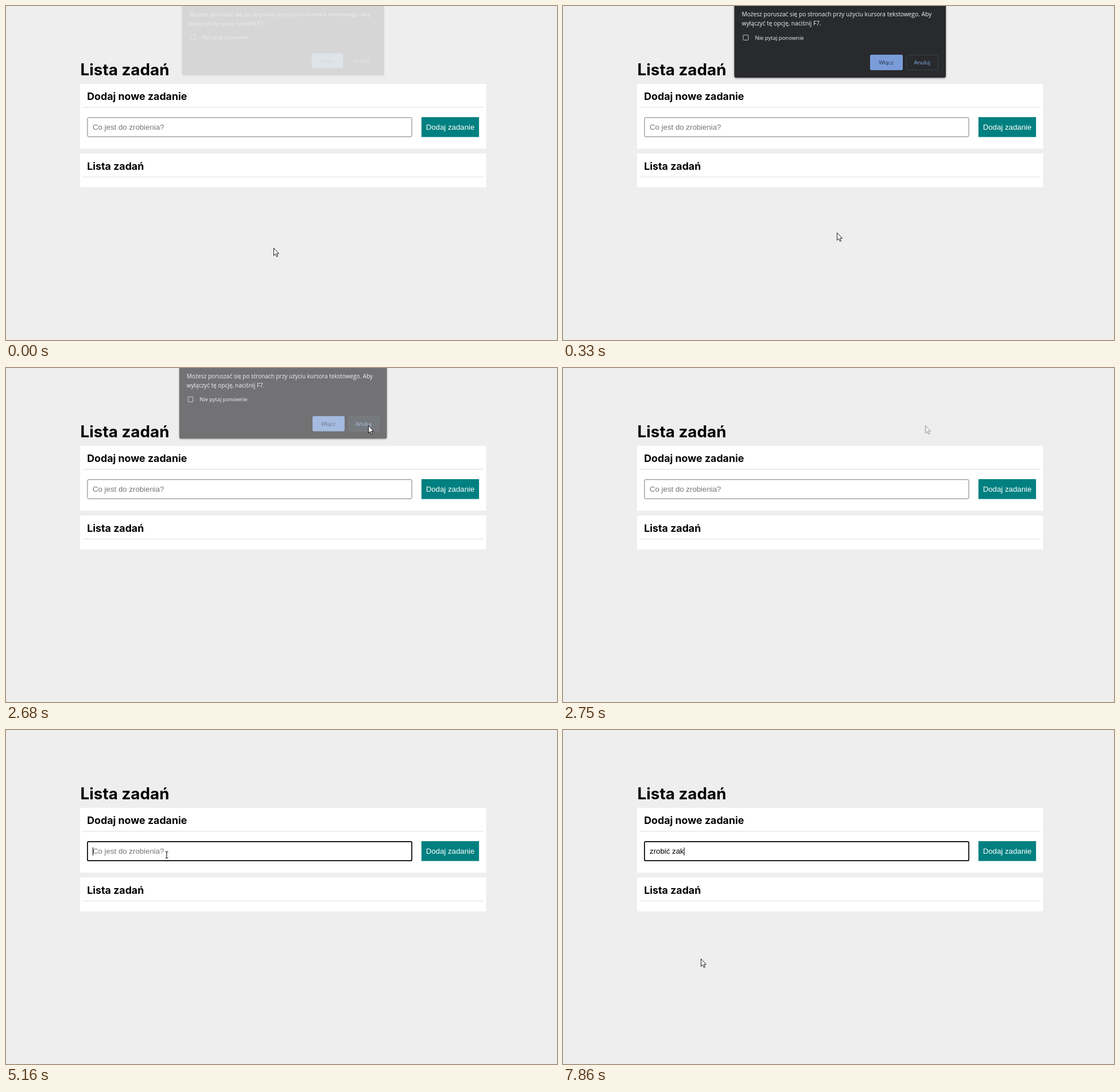
Recreate the animation shown at these times as an HTML page. Size 960 by 583 pixels, loop 7.99 s.

```html
<!DOCTYPE html>
<html lang="pl">
<head>
<meta charset="utf-8">
<title>Lista zadań</title>
<style>
  html, body { margin: 0; width: 100%; height: 100%; overflow: hidden; background: #eee; }
  svg { display: block; width: 960px; height: 583px; }
  text { white-space: pre; }
  .h1, .h2 { font-family: Inter, sans-serif; font-weight: 700; }
  .h1 { font-size: 27.8px; }
  .h2 { font-size: 17.8px; }
  .form { font: 13.26px "Liberation Sans", Arial, sans-serif; }
  .msg { font: 10.2px "Open Sans", "Noto Sans", sans-serif; fill: #f1f3f4; }
  .small { font: 9.5px "Open Sans", "Noto Sans", sans-serif; fill: #f1f3f4; }
  #dialog { transform-origin: 483px 37px; }
  .box { filter: drop-shadow(0 1px 1.5px rgba(0, 0, 0, .5)); }
  #field { fill: #fff; stroke: #767676; }
  #field.focus { stroke: #000; stroke-width: 1.7px; }
</style>
</head>
<body>
<svg viewBox="0 0 960 583">
  <rect width="960" height="583" fill="#eee"/>
  <text class="h1" x="129.6" y="121">Lista zadań</text>

  <rect x="129" y="136" width="707.5" height="113" fill="#fff"/>
  <text class="h2" x="141.2" y="164">Dodaj nowe zadanie</text>
  <rect x="133.5" y="176" width="698.5" height="1.6" fill="#eaeaea"/>
  <rect id="field" x="142" y="194.8" width="565" height="33.4" rx="2"/>
  <text id="entry" class="form" x="151" y="215.5"></text>
  <rect id="caret" y="205" width="1" height="14"/>
  <rect x="723.8" y="194" width="100.4" height="34.7" fill="#008080"/>
  <text class="form" x="774" y="215.5" text-anchor="middle" fill="#fff">Dodaj zadanie</text>

  <rect x="129" y="257.5" width="707.5" height="59" fill="#fff"/>
  <text class="h2" x="141.2" y="285.6">Lista zadań</text>
  <rect x="133.5" y="297.6" width="698.5" height="1.6" fill="#eaeaea"/>

  <g id="dialog">
    <rect class="box" x="298.5" y="-40" width="368.5" height="165" rx="3.5" fill="#292a2d"/>
    <text class="msg" x="311.5" y="17.6">Możesz poruszać się po stronach przy użyciu kursora tekstowego. Aby</text>
    <text class="msg" x="311.5" y="34">wyłączyć tę opcję, naciśnij F7.</text>
    <rect x="314" y="50.7" width="8.8" height="8.8" rx=".6" fill="none" stroke="#bdc1c6"/>
    <text class="small" x="334.5" y="58.6">Nie pytaj ponownie</text>
    <rect x="535" y="85" width="57" height="27" rx="2.5" fill="#7a9dd9"/>
    <text class="small" x="563" y="102" text-anchor="middle" style="fill:#25304a">Włącz</text>
    <rect id="cancel" x="598.5" y="85.5" width="55" height="26" rx="2.5" stroke="#3c4043"/>
    <text class="small" x="625.7" y="102" text-anchor="middle" style="fill:#8ab4f8">Anuluj</text>
  </g>

  <g id="pointer">
    <path id="arrow" d="M.5 .5V13.6L3.5 10.8L5.5 15.6L7.6 14.7L5.6 10.1H9.4Z" fill="#fff" stroke="#000" stroke-width=".9"/>
    <path id="beam" d="M-2.5 -5.5H-.8L0 -4.9L.8 -5.5H2.5M0 -5V5M-2.5 5.5H-.8L0 4.9L.8 5.5H2.5" fill="none" stroke="#000"/>
  </g>
</svg>
<script>
const LOOP = 7990, FOCUS = 4970, BLINK = 530, TYPE = 6650, KEY = 134, CLOSED = 2750;
const HINT = 'Co jest do zrobienia?', TASK = 'zrobić zak';

// Pointer moves: start time, end time, destination
const home = [466, 422];
const moves = [
  [200, 820, 562, 190], [820, 1150, 606, 135], [1220, 1620, 631, 100],
  [2880, 3210, 695, 0], [3680, 4280, 403, 278], [4350, 4690, 306, 321],
  [4690, 5130, 280, 218], [5290, 5500, 240, 399]
];

const $ = id => document.getElementById(id);
const ramp = (t, a, b) => Math.min(1, Math.max(0, (t - a) / (b - a)));
const smooth = p => p * p * (3 - 2 * p);
const show = (id, on) => { $(id).style.display = on ? '' : 'none'; };

function pointerAt(t) {
  return moves.reduce(([x, y], [a, b, toX, toY]) => {
    const p = smooth(ramp(t, a, b));
    return [x + (toX - x) * p, y + (toY - y) * p];
  }, home);
}

function within(id, [x, y]) {
  const b = $(id).getBBox();
  return x > b.x && x < b.x + b.width && y > b.y && y < b.y + b.height;
}

function drawDialog(t, pos) {
  const alpha = ramp(t, -22, 175) * (1 - ramp(t, 2640, CLOSED));
  $('dialog').style.opacity = alpha;
  $('dialog').style.transform = `scale(${.95 + .05 * alpha})`;
  $('cancel').style.fill = within('cancel', pos) ? '#30343b' : '#292a2d';
}

function drawField(t) {
  const typed = TASK.slice(0, Math.max(0, Math.ceil((t - TYPE) / KEY)));
  const entry = $('entry');
  entry.textContent = typed || HINT;
  entry.style.fill = typed ? '#000' : '#757575';
  $('field').classList.toggle('focus', t >= FOCUS);

  const blinkOn = Math.floor((t - FOCUS) / BLINK) % 2 === 0;
  $('caret').setAttribute('x', 151 + (typed ? entry.getComputedTextLength() : 0));
  show('caret', t >= FOCUS && (typed || blinkOn));
}

function drawPointer(t, pos) {
  const overField = within('field', pos);
  $('pointer').setAttribute('transform', `translate(${pos})`);
  $('pointer').style.opacity = t >= CLOSED && t < CLOSED + 130 ? .45 : 1;
  show('arrow', !overField);
  show('beam', overField);
}

const start = performance.now();
function tick() {
  const t = (performance.now() - start) % LOOP;
  const pos = pointerAt(t);
  drawDialog(t, pos);
  drawField(t);
  drawPointer(t, pos);
  requestAnimationFrame(tick);
}
tick();
</script>
</body>
</html>
```
